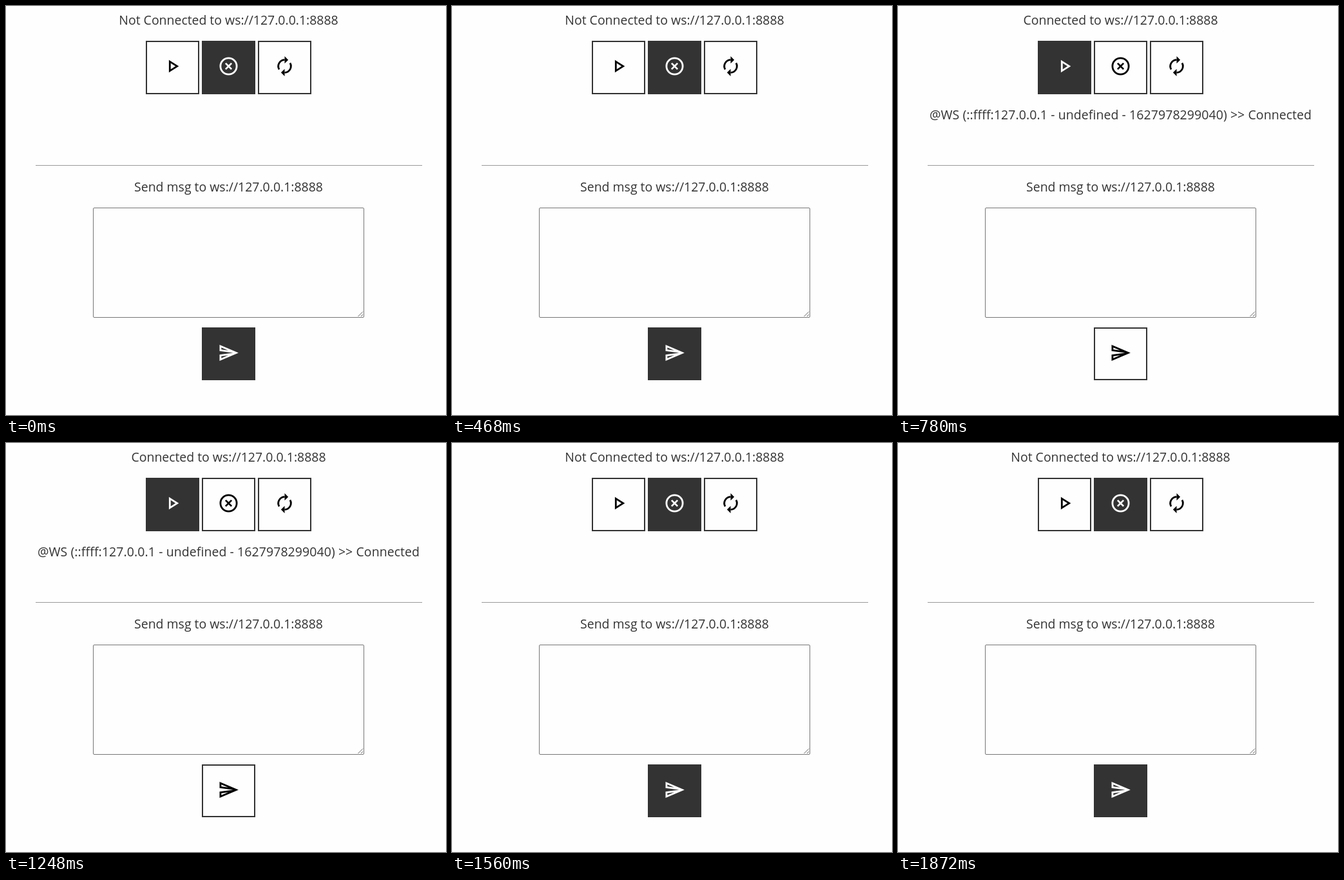
Recreate the animation shown at these times as an HTML page. Size 683x635 px, loop 2.08 s.

```html
<!DOCTYPE html>
<html lang="en">
<head>
<meta charset="utf-8">
<title>WebSocket client</title>
<style>
html, body { margin: 0; width: 100%; height: 100%; overflow: hidden; background: #fefefe; }
svg { display: block; }
text { font: 19.45px "Open Sans", "Noto Sans", sans-serif; fill: #333; text-anchor: middle; }
.log { letter-spacing: .1px; }
.btn { fill: #fefefe; color: #000; }
.btn rect { stroke: #333; stroke-width: 2; }
.icon { fill: currentColor; }
.line { fill: none; stroke: currentColor; stroke-width: 2; }

/* Connected between 780 ms and 1560 ms of each 2080 ms loop */
.online, .offline, .lit, .dim { animation: 2080ms step-end infinite; }
.online { animation-name: online; }
.offline { animation-name: offline; }
.lit { animation-name: lit; }
.dim { animation-name: dim; }
@keyframes online { 0%, 75% { visibility: hidden; } 37.5% { visibility: visible; } }
@keyframes offline { 0%, 75% { visibility: visible; } 37.5% { visibility: hidden; } }
@keyframes lit { 0%, 75% { fill: #fefefe; color: #000; } 37.5% { fill: #333; color: #fff; } }
@keyframes dim { 0%, 75% { fill: #333; color: #fff; } 37.5% { fill: #fefefe; color: #000; } }
</style>
</head>
<body>
<svg width="683" height="635" viewBox="0 0 683 635">
  <text class="offline" x="345.5" y="29">Not Connected to ws://127.0.0.1:8888</text>
  <text class="online" x="345.5" y="29">Connected to ws://127.0.0.1:8888</text>

  <g class="btn lit">
    <rect x="218" y="55" width="81" height="81"/>
    <path class="icon" transform="translate(241.7 76.7) scale(1.4)" d="M10 8.64L15.27 12 10 15.36V8.64M8 5v14l11-7z"/>
  </g>
  <g class="btn dim">
    <rect x="305" y="55" width="81" height="81"/>
    <g class="line" transform="translate(328.7 76.7) scale(1.4)">
      <circle cx="12" cy="12" r="9"/>
      <path d="M8.7 8.7l6.6 6.6M15.3 8.7l-6.6 6.6"/>
    </g>
  </g>
  <g class="btn">
    <rect x="392" y="55" width="81" height="81"/>
    <g transform="translate(415.7 76.7) scale(1.4)">
      <path class="line" d="M12 5A7 7 0 0 0 5.97 15.53M12 19A7 7 0 0 0 18.03 8.47"/>
      <path class="icon" d="M12 1l4 4-4 4zM12 15l-4 4 4 4z"/>
    </g>
  </g>

  <text class="online log" x="345.5" y="176">@WS (::ffff:127.0.0.1 - undefined - 1627978299040) &gt;&gt; Connected</text>

  <path d="M46 247.5h600" stroke="#999"/>
  <text x="345.5" y="288">Send msg to ws://127.0.0.1:8888</text>

  <rect x="135.5" y="313.5" width="420" height="170" rx="1.5" fill="#fefefe" stroke="#767676"/>
  <path d="M546.5 482l7.5-7.5M551 482l3-3" stroke="#666"/>

  <g class="btn dim">
    <rect x="305" y="500" width="81" height="80"/>
    <path class="icon" transform="translate(328.7 521.7) scale(1.4)" d="M4.01 6.03l7.51 3.22-7.52-1 .01-2.22m7.5 8.72L4 17.97v-2.22l7.51-1M2.01 3L2 10l15 2-15 2 .01 7L23 12z"/>
  </g>
</svg>
</body>
</html>
```
